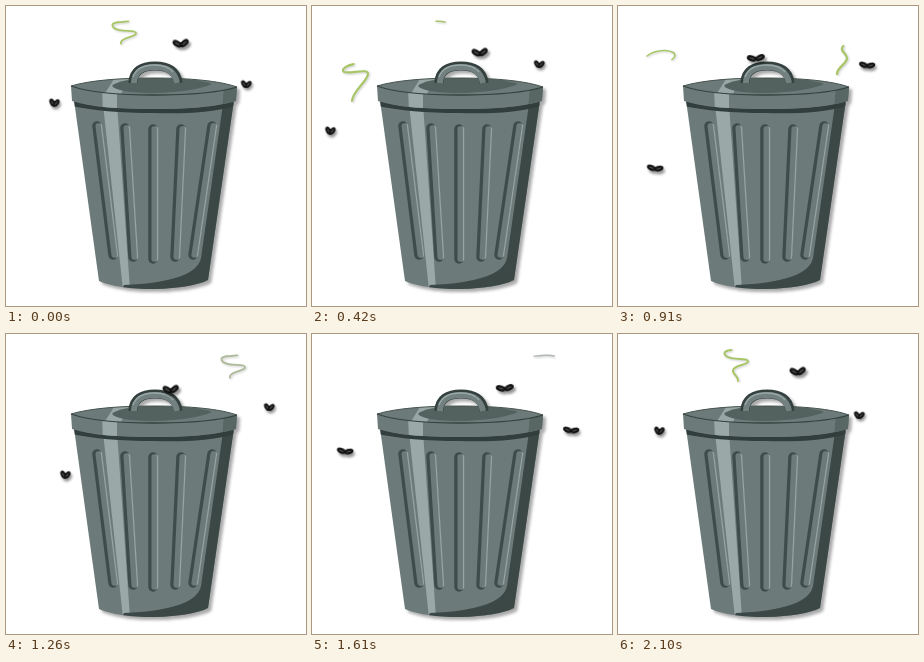
Animation of 300x300 px, one loop 2170 ms. Source, as an HTML page:

```html
<!DOCTYPE html>
<html lang="en">
<head>
<meta charset="utf-8">
<title>Trash can</title>
<style>
html, body { margin: 0; width: 100%; height: 100%; overflow: hidden; background: #fff; }
svg { display: block; width: 100vw; height: 100vh; }
.can { filter: drop-shadow(3px 3px 1.5px #0005); }
.smell path { fill: none; stroke-linecap: round; filter: drop-shadow(1px 1.5px 1px #0003); }
.fly { filter: drop-shadow(2px 3px 1px #0006); }
.fly ellipse { fill: #4a4d4d; stroke: #111; stroke-width: 2.2; }
.slot { fill: none; stroke-linecap: round; }
</style>
</head>
<body>
<svg viewBox="0 0 300 300">
  <defs>
    <clipPath id="bodyClip"><path id="bodyShape" d="M68 94L93 275Q112 283 148 283Q186 282 202 274L228 94Z"/></clipPath>
    <clipPath id="topClip"><path id="topShape" d="M65 80C85 74 116 72 148 72C184 72 214 75 231 81C212 87 184 89 148 89C112 89 82 86 65 80Z"/></clipPath>
    <clipPath id="bandClip"><path id="bandShape" d="M65 80C82 86 112 89 148 89C184 89 212 87 231 81L230 95C210 101 182 103 148 103C112 103 84 101 66 95Z"/></clipPath>
  </defs>
  <g class="can">
    <use href="#bodyShape" fill="#6c7b79"/>
    <g clip-path="url(#bodyClip)">
      <path d="M97 98H111L124 284H117Z" fill="#9aa9a7"/>
      <path d="M217 98L195 252Q190 276 118 279L112 290H240V98Z" fill="#3b4846"/>
      <path d="M66 94C84 101 112 103 148 103C182 103 210 101 232 94V99C210 106 182 108 148 107C112 107 84 104 66 100Z" fill="#323e3c"/>
    </g>
    <g id="slots"></g>
    <use href="#bandShape" fill="#6c7b79"/>
    <g clip-path="url(#bandClip)">
      <path d="M96 80H111V106H97Z" fill="#9aa9a7"/>
      <path d="M218 80H234V104H216Z" fill="#586664"/>
    </g>
    <use href="#topShape" fill="#6c7b79"/>
    <g clip-path="url(#topClip)">
      <path d="M110 70L96 92H113L124 70Z" fill="#98a7a5"/>
      <path d="M106 80Q112 73 148 72Q190 72 206 78Q188 86 148 87Q112 87 106 80Z" fill="#53615f"/>
    </g>
    <path d="M65 80C82 86 112 89 148 89C184 89 212 87 231 81" fill="none" stroke="#34413f" stroke-width="1.3"/>
    <path d="M65 80C85 74 116 72 148 72C184 72 214 75 231 81" fill="none" stroke="#46534f" stroke-width="1"/>
    <path d="M127 77C127 65 136 60 149 60C162 60 171 65 172 77" fill="none" stroke="#34413f" stroke-width="9"/>
    <path d="M128 77C128 66 137 61 149 61C161 61 169 66 171 77" fill="none" stroke="#72817f" stroke-width="6"/>
    <path d="M127 71C130 62 139 59 149 59C157 59 163 61 167 66" fill="none" stroke="#98a7a5" stroke-width="1.3"/>
  </g>
  <g id="smells" class="smell"></g>
  <g id="flies"></g>
</svg>
<script>
const STEP = 70, FRAMES = 31, LOOP = STEP * FRAMES;

function add(parent, tag, attrs = {}) {
  const el = document.createElementNS('http://www.w3.org/2000/svg', tag);
  for (const k in attrs) el.setAttribute(k, attrs[k]);
  return parent.appendChild(el);
}
const byId = id => document.getElementById(id);
const clamp = v => Math.max(0, Math.min(1, v));

// Grooves: top x, y and bottom x, y
[[91, 120, 107, 249], [119, 122, 127, 251], [147, 123, 147, 253],
 [175, 123, 169, 251], [206, 120, 187, 249]].forEach(([x1, y1, x2, y2]) => {
  [[0, '#3f4c4a', 9.5], [2.8, '#96a5a3', 4.8], [1.2, '#6c7b79', 5.4]].forEach(([dx, color, w]) =>
    add(byId('slots'), 'path', {
      class: 'slot', d: `M${x1 + dx} ${y1}L${x2 + dx} ${y2}`, stroke: color, 'stroke-width': w
    }));
});

// Smells: a streak runs along a fixed path, its tail following later
const wave = 'M219 68C219 61 229 58 229 52C229 48 223 46 224 42C225 37 240 37 239 33' +
  'C238 29 224 33 217 28C212 23 220 22 225 22C232 21 238 21 242 22';
const zigzag = 'M40 95C41 84 55 76 56 68C57 62 38 68 32 66C28 63 36 59 42 58' +
  'C49 57 60 52 56 47C50 43 36 44 29 50';
const green = [168, 198, 104], grey = [176, 182, 176];
const smells = [
  { d: wave, move: 'translate(-109 -6)', birth: 1680, fade: 0 },
  { d: zigzag, move: '', birth: 140, fade: 0 },
  { d: wave, move: '', birth: 770, fade: 1 }
].map(s => ({ ...s, el: add(byId('smells'), 'path', { d: s.d, transform: s.move, pathLength: 100 }) }));

function drawSmell({ el, birth, fade }, time) {
  const age = (time - birth + LOOP) % LOOP;
  const head = 1 - (1 - clamp(age / 650)) ** 1.6;
  const tail = clamp((age - 300) / 670);
  el.style.display = head > tail ? '' : 'none';
  const mix = fade * clamp((age - 140) / 500);
  const color = green.map((c, i) => c + (grey[i] - c) * mix);
  el.setAttribute('stroke', `rgb(${color.map(Math.round)})`);
  el.setAttribute('stroke-width', 2.5 - 1.2 * clamp(age / 970));
  el.setAttribute('stroke-dasharray', `${(head - tail) * 100} 300`);
  el.setAttribute('stroke-dashoffset', -tail * 100);
}

// Flies: keys are step, x, y on a closed smooth path
const flies = [
  { up: 32, size: 0.85, tilt: 6, keys: [[0, 48, 96], [3, 31, 106], [6, 18, 124], [8, 12, 139], [10, 19, 150],
    [13, 37, 161], [15, 50, 162], [18, 59, 140], [23, 33, 116], [26, 16, 106], [28, 23, 98], [30, 41, 96]] },
  { up: 54, size: 1, tilt: -5, keys: [[0, 175, 36], [6, 168, 45], [10, 152, 41], [13, 138, 51],
    [18, 165, 54], [23, 193, 53], [30, 180, 36]] },
  { up: 38, size: 0.8, tilt: 5, keys: [[0, 240, 77], [6, 227, 57], [10, 241, 48], [13, 249, 58],
    [18, 263, 72], [20, 266, 82], [23, 259, 95], [30, 241, 80]] }
].map(f => {
  const el = add(byId('flies'), 'g', { class: 'fly' });
  const wings = [-1, 1].map(() => add(el, 'ellipse', { cy: -4.4, rx: 1.9, ry: 4 }));
  return { ...f, el, wings };
});

function along(keys, step) {
  const n = keys.length;
  const key = i => {
    const [t, x, y] = keys[(i + n) % n];
    return [t + FRAMES * Math.floor(i / n), x, y];
  };
  let i = n - 1;
  while (keys[i][0] > step) i--;
  const [p, a, b, q] = [-1, 0, 1, 2].map(k => key(i + k));
  const span = b[0] - a[0], u = (step - a[0]) / span;
  return [1, 2].map(c => {
    const va = (b[c] - p[c]) / (b[0] - p[0]) * span;
    const vb = (q[c] - a[c]) / (q[0] - a[0]) * span;
    const d = b[c] - a[c];
    return a[c] + u * (va + u * (3 * d - 2 * va - vb + u * (va + vb - 2 * d)));
  });
}

function drawFly({ el, wings, keys, up, size, tilt }, step) {
  const [x, y] = along(keys, step);
  const flat = step % 2;
  const angle = flat ? 70 : up;
  const drop = flat ? 2.5 : 4;
  el.setAttribute('transform', `translate(${x} ${y + drop}) rotate(${tilt}) scale(${flat ? (size + 1) / 2 : size})`);
  wings.forEach((w, i) => w.setAttribute('transform', `rotate(${i ? angle : -angle})`));
}

const start = performance.now();
function draw() {
  const step = Math.floor((performance.now() - start) % LOOP / STEP);
  smells.forEach(s => drawSmell(s, step * STEP));
  flies.forEach(f => drawFly(f, step));
  requestAnimationFrame(draw);
}
draw();
</script>
</body>
</html>
```
